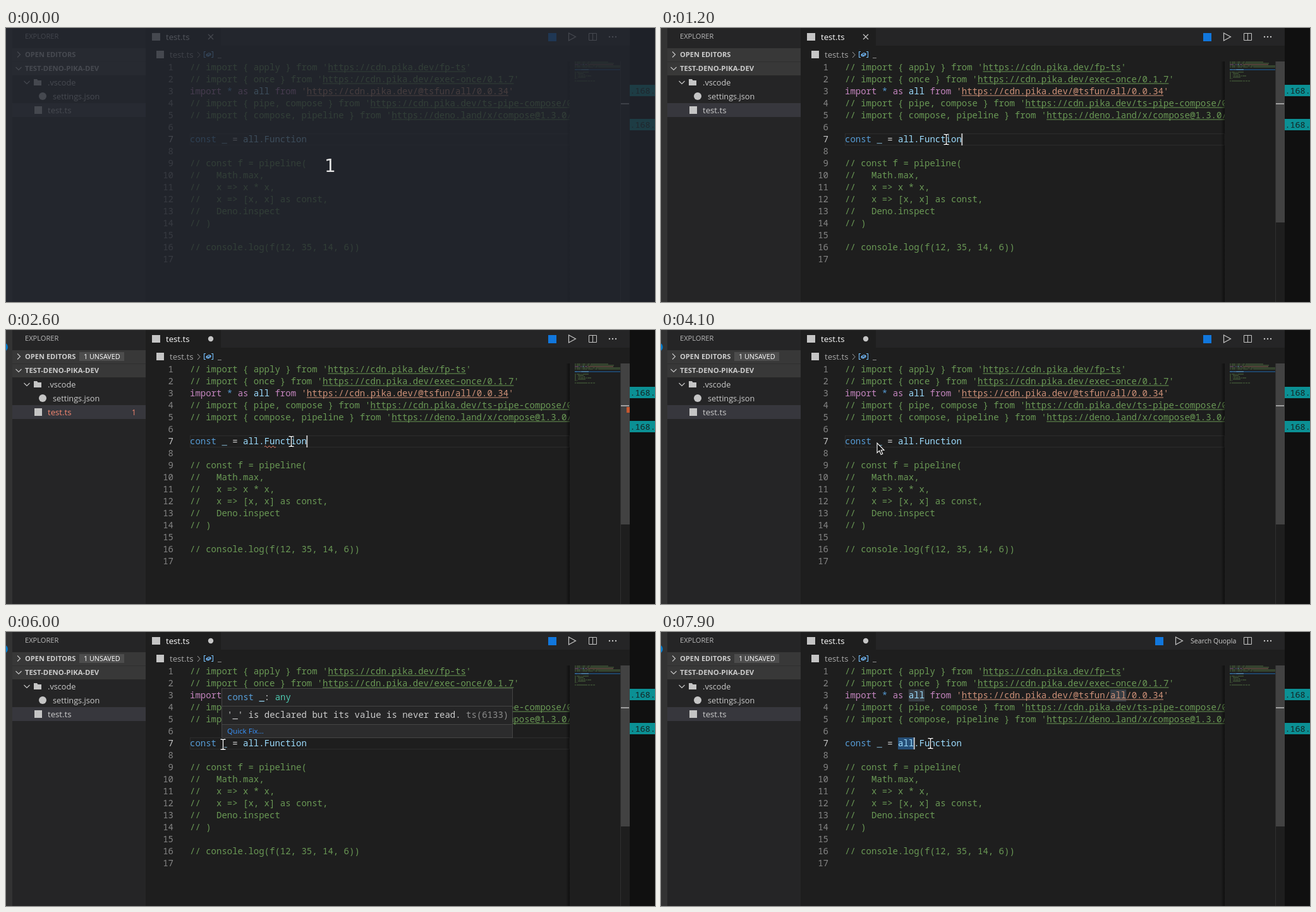
An HTML page that plays this animation: 1027 by 434 pixels, repeating every 8 s.

```html
<!DOCTYPE html>
<html lang="en">
<head>
<meta charset="utf-8">
<title>Editor</title>
<style>
html, body { margin: 0; width: 100%; height: 100%; overflow: hidden; background: #1e1e1e; }
svg { display: block; width: 1027px; height: 434px; }
text { white-space: pre; }
.ui { font-family: 'Open Sans', 'Noto Sans', sans-serif; }
.code { font: 14px 'Roboto Mono', 'Noto Sans Mono', monospace; }
.line { fill: none; stroke: #c5c5c5; }
</style>
</head>
<body>
<svg id="stage" viewBox="0 0 1027 434" xmlns="http://www.w3.org/2000/svg"></svg>
<script>
const LOOP = 8000, LEFT = 291, CH = 8.4;
const C = {
  comment: '#6a9955', key: '#c586c0', blue: '#569cd6', name: '#9cdcfe',
  str: '#ce9178', plain: '#d4d4d4', ui: '#cccccc', error: '#f48771'
};
const midY = n => 62 + 19 * (n - 1);
const colX = c => LEFT + c * CH;

const rect = (x, y, w, h, fill, more = '') =>
  `<rect x="${x}" y="${y}" width="${w}" height="${h}" fill="${fill}" ${more}/>`;
const path = (d, more = '') => `<path d="${d}" class="line" ${more}/>`;
const ui = (x, y, s, size = 13, fill = C.ui, more = '') =>
  `<text class="ui" x="${x}" y="${y}" font-size="${size}" fill="${fill}" ${more}>${s}</text>`;
const esc = s => s.replace(/&/g, '&amp;').replace(/</g, '&lt;').replace(/>/g, '&gt;');
const code = (x, y, parts, more = '') =>
  `<text class="code" xml:space="preserve" x="${x}" y="${y}" ${more}>` +
  parts.map(([s, c, m = '']) => `<tspan fill="${c}" ${m}>${esc(s)}</tspan>`).join('') + '</text>';
const group = (id, body, more = '') => `<g id="${id}" ${more}>${body}</g>`;
const chevron = (x, y, down) =>
  path(down ? `M${x - 4.5} ${y - 2}l4.5 4.5l4.5-4.5` : `M${x - 2} ${y - 4.5}l4.5 4.5l-4.5 4.5`, 'stroke-width="1.2"');
const symbolIcon = (x, y) =>
  `<g transform="translate(${x} ${y})" fill="none" stroke="#75beff" stroke-width="1.1">
  <path d="M-4.5-4.5h-2.5v9h2.5M4.5-4.5h2.5v9h-2.5M-3.5 0l4-2.5l3 1.2v2l-4 2.3l-3-1.2zM-3.5 0l3 1.2l4-2.5M-.5 1.2v1.8"/></g>`;

const note = s => [[s, C.comment]];
const lines = [
  note("// import { apply } from 'https://cdn.pika.dev/fp-ts'"),
  note("// import { once } from 'https://cdn.pika.dev/exec-once/0.1.7'"),
  [['import ', C.key], ['* ', C.blue], ['as ', C.key], ['all ', C.name], ['from ', C.key],
    ["'https://cdn.pika.dev/@tsfun/all/0.0.34'", C.str]],
  note("// import { pipe, compose } from 'https://cdn.pika.dev/ts-pipe-compose/0.2.1'"),
  note("// import { compose, pipeline } from 'https://deno.land/x/compose@1.3.0/index.js'"),
  [],
  [['const ', C.blue], ['_', C.name, 'opacity=".67"'], [' = ', C.plain], ['all.', C.name],
    ['Function', C.name, 'id="word"']],
  [],
  note('// const f = pipeline('),
  note('//   Math.max,'),
  note('//   x => x * x,'),
  note('//   x => [x, x] as const,'),
  note('//   Deno.inspect'),
  note('// )'),
  [],
  note('// console.log(f(12, 35, 14, 6))'),
  []
];

function drawLine(parts, i) {
  const y = midY(i + 1), s = parts.map(p => p[0]).join('');
  const url = s.match(/https[^']+/);
  let out = code(LEFT, y + 5, parts);
  if (url) out += rect(colX(url.index), y + 6.5, url[0].length * CH, 1, parts[parts.length - 1][1]);
  return out;
}

function drawMinimap() {
  let out = rect(900, 65, 72, 2, '#1f4468');
  lines.forEach((parts, i) => {
    let col = 0;
    for (const [s, c] of parts) {
      for (const m of s.matchAll(/\S+/g))
        out += rect(900 + col + m.index, 53.3 + 2 * i, m[0].length, 1.2, c, 'opacity=".5"');
      col += s.length;
    }
  });
  return `<g clip-path="url(#mapClip)">${out}</g>`;
}

function drawSidebar() {
  return rect(0, 0, 10, 434, '#333333') + rect(10, 0, 211, 434, '#252526') +
    rect(10, 32, 211, 21, '#383838') + rect(10, 53.5, 211, 21.5, '#383838') +
    rect(10, 119, 211, 22, '#37373d') +
    ui(30, 17, 'EXPLORER', 11.1, '#bbbbbb') +
    chevron(20, 42) + ui(30, 46, 'OPEN EDITORS', 11.1, C.ui, 'font-weight="700"') +
    chevron(20, 64, true) + ui(30, 68, 'TEST-DENO-PIKA-DEV', 11.3, C.ui, 'font-weight="700"') +
    chevron(33, 86, true) +
    '<path d="M44 81h5l1.5 2h5.5v8h-12z" fill="#c5c5c5"/>' + ui(66, 91, '.vscode', 12.7) +
    '<circle cx="58" cy="108" r="6" fill="#c5c5c5"/>' + ui(74, 113, 'settings.json', 12.7) +
    rect(45, 124, 12, 12, '#c5c5c5') + ui(66, 135, 'test.ts', 13.2, C.ui, 'id="file"') +
    ui(199, 135, '1', 12, C.error, 'id="count"') +
    group('unsaved', rect(116, 35, 71, 14, '#4d4d4d') + ui(123, 45.5, '1 UNSAVED', 10.8, '#fff') +
      '<circle cx="-4" cy="27" r="7" fill="#007acc"/>');
}

function drawHeader() {
  return rect(221, 0, 766, 28, '#252526') + rect(221, 0, 119, 28, '#1e1e1e') +
    rect(231, 8, 13, 12, '#c5c5c5') + ui(253, 19, 'test.ts', 13.2, '#fff') +
    path('M320 10l8 8m0-8l-8 8', 'id="close" stroke-width="1.2"') +
    '<circle id="dot" cx="324" cy="14" r="4.2" fill="#c5c5c5"/>' +
    group('tools', rect(858, 8, 13, 13, '#1177dd') + path('M890.5 8v12l11-6z', 'stroke-width="1.2"')) +
    ui(838, 18, 'Search Quopla', 10.6, C.ui, 'id="search"') +
    path('M922.5 8.5h12v11h-12zM928.5 8.5v11') +
    [955, 960, 965].map(x => `<circle cx="${x}" cy="14" r="1.2" fill="#c5c5c5"/>`).join('') +
    rect(238, 36, 12, 12, '#c5c5c5') + ui(259, 47, 'test.ts', 13.2, '#a9a9a9') +
    path('M303 38l4 4.5l-4 4.5', 'opacity=".8"') + symbolIcon(320.5, 42) + ui(335, 46, '_', 13, '#a9a9a9');
}

function drawSuggest() {
  const rows = [['Function', 'import Function'], ['ffm', 'FlowFixMe (React-Na…'], ['for', 'For Loop (TypeScrip…'],
    ['foreach =>', 'For-Each Loop using…'], ['forin', 'For-In Loop (TypeSc…'],
    ['forof', 'For-Of Loop (TypeSc…'], ['function', 'Function Statement …']];
  let out = rect(417.5, 186.5, 429, 132, '#252526', 'stroke="#454545"') + rect(418, 187, 428, 19, '#062f4a');
  rows.forEach(([label, info], i) => {
    const y = 196 + 19 * i;
    out += code(440.5, y + 5, [[label[0], '#0097fb', 'font-weight="700"'], [label.slice(1), C.plain]]) +
      code(i ? 660 : 710, y + 5, [[info, i ? '#929292' : '#9aa9b3']]);
    out += i ? path(`M422.5 ${y + 6.5}v-12h12v12`) + path(`M422.5 ${y + 6.5}h12`, 'stroke-dasharray="2 1.5"')
      : symbolIcon(428, y + 1);
  });
  return out;
}

function drawHover() {
  return rect(341.5, 89.5, 460, 78, '#252526', 'stroke="#454545"') + rect(342, 147, 459, 20, '#2c2c2d') +
    rect(342, 117, 459, 1, '#454545') + rect(342, 146, 459, 1, '#454545') +
    code(350, 108, [['const ', C.blue], ['_', C.name], [': ', C.plain], ['any', '#4ec9b0']]) +
    code(350, 136, [["'_' is declared but its value is never read. ", C.ui], ['ts(6133)', '#8c8c8c']]) +
    ui(350, 161, 'Quick Fix...', 11.6, '#3794ff');
}

function drawTerminal() {
  return rect(987, 0, 40, 434, '#101010') + [90, 144].map(y =>
    rect(987, y, 40, 18, '#0b9094') +
    code(987.5, y + 14, [['.168.', '#152020']], 'style="font-size:13.4px"')).join('');
}

const wave = 'M409 185' + 'q1.5-3 3 0t3 0'.repeat(3);
const beam = 'M-4-8h2.5q1.5 0 1.5 1.5v13q0 1.5-1.5 1.5h-2.5M4-8h-2.5q-1.5 0-1.5 1.5v13q0 1.5 1.5 1.5h2.5';
const stage = document.getElementById('stage');
stage.innerHTML = `<defs>
  <clipPath id="codeClip"><rect x="221" y="53" width="671" height="381"/></clipPath>
  <clipPath id="mapClip"><rect x="892" y="53" width="80" height="381"/></clipPath>
  <linearGradient id="shade"><stop stop-color="#000" stop-opacity="0"/><stop offset="1" stop-color="#000" stop-opacity=".5"/></linearGradient>
  </defs>` +
  rect(221, 0, 766, 434, '#1e1e1e') + drawSidebar() + drawHeader() +
  group('current', rect(291.5, 167.5, 600, 18, 'none', 'stroke="#2d2d2d"')) +
  rect(0, 167, 0, 19, '#264f78', 'id="sel"') +
  group('same', [12, 50].map(c => rect(colX(c), 91, 25.2, 19, '#373d43')).join('')) +
  `<g clip-path="url(#codeClip)">${lines.map(drawLine).join('')}</g>` +
  lines.map((_, i) => ui(265, midY(i + 1) + 5, i + 1, 14, i === 6 ? '#c6c6c6' : '#858585',
    'text-anchor="end" style="font-family:\'Roboto Mono\',\'Noto Sans Mono\',monospace"')).join('') +
  path(wave, `id="wave" style="stroke:${C.error}"`) +
  rect(0, 167, 1.8, 19, '#d0d0d0', 'id="caret"') +
  rect(886, 53, 6, 381, 'url(#shade)') + drawMinimap() +
  rect(972, 53, 1, 381, '#303030') + rect(973, 53, 14, 255, '#797979', 'id="slider"') +
  rect(973, 119, 13, 2, '#a0a0a0') + rect(982, 122, 5, 9, '#c4572f', 'id="mark"') +
  drawTerminal() + group('suggest', drawSuggest()) + group('hover', drawHover()) +
  group('beam', `<path d="${beam}" fill="none" stroke="#000" stroke-width="3.4"/>
    <path d="${beam}" fill="none" stroke="#fff" stroke-width="1.4"/>`) +
  group('arrow', '<path d="M0 0v15.5l3.6-3.3l2.6 6l2.6-1.2l-2.6-5.7h4.8z" fill="#111" stroke="#fff" stroke-width="1.1"/>') +
  group('countdown', rect(0, 0, 1027, 434, '#23272f', 'opacity=".79"') +
    '<text x="513" y="228" font-size="28" text-anchor="middle" fill="#e2e2e2" font-family="\'DejaVu Sans\', sans-serif">1</text>');

const el = {};
stage.querySelectorAll('[id]').forEach(e => el[e.id] = e);
const show = (id, on) => el[id].setAttribute('visibility', on ? 'visible' : 'hidden');
const set = (id, key, v) => el[id].setAttribute(key, v);

// time, x, y of the pointer
const route = [
  [500, 982, 100], [600, 850, 128], [700, 660, 190], [800, 499, 205], [900, 499, 205],
  [1000, 480, 190], [1200, 451.5, 176.5], [3100, 451.5, 176.5], [3300, 396, 174], [3500, 396, 174],
  [3800, 327, 172], [3900, 338, 182], [4000, 338, 182], [4100, 342, 179], [4200, 343.5, 178],
  [6600, 343.5, 178], [6800, 301, 177], [7000, 388, 177], [7600, 388, 177], [7900, 426.5, 176.5], [8000, 426.5, 176.5]
];
function pointer(t) {
  const i = Math.max(1, route.findIndex(k => k[0] >= t));
  const [a, b] = [route[i - 1], route[i]];
  const p = (t - a[0]) / (b[0] - a[0]);
  return [a[1] + (b[1] - a[1]) * p, a[2] + (b[2] - a[2]) * p];
}

// caret: start, end, column
const carets = [[1200, 1900, 22], [1900, 2100, 15], [2100, 2900, 22], [3300, 3900, 22], [4400, 4900, 22],
  [5400, 5900, 22], [6100, 6700, 7], [7200, 7700, 11], [7700, 8000, 13]];
// selection: start, end, column, length
const picks = [[1400, 1900, 14, 8], [6300, 7200, 6, 1], [7700, 8000, 10, 3]];

function render(time) {
  const t = Math.floor(time / 100) * 100;
  const within = (a, b) => t >= a && t < b;
  const at = list => list.find(k => within(k[0], k[1]));

  show('countdown', t < 300);
  const dirty = t >= 1900;
  show('unsaved', dirty);
  show('dot', dirty);
  show('close', !dirty);

  const pick = at(picks), wide = pick || within(1900, 2100);
  show('current', !pick);
  set('sel', 'x', pick ? colX(pick[2]) : 0);
  set('sel', 'width', pick ? pick[3] * CH : 0);
  show('same', t >= 7700);
  show('search', wide);
  set('tools', 'transform', `translate(${wide ? -76 : 0} 0)`);

  const typed = within(1900, 2100) ? 'F' : 'Function';
  if (el.word.textContent !== typed) el.word.textContent = typed;
  show('suggest', within(1900, 2100));

  const bad = within(2600, 2800);
  show('wave', bad);
  show('count', bad);
  show('mark', within(2600, 2900));
  set('file', 'fill', bad ? C.error : C.ui);

  const caret = at(carets);
  show('caret', caret);
  if (caret) set('caret', 'x', colX(caret[2]) - 0.4);

  set('slider', 'opacity', 0.4 * Math.min(1, Math.max(0, (t - 400) / 400)));
  show('hover', within(4200, 6100));
  set('hover', 'opacity', t < 4400 ? 0.75 : 1);

  const arrow = t === 4100;
  show('arrow', arrow);
  show('beam', t >= 500 && !arrow);
  if (t >= 500) set(arrow ? 'arrow' : 'beam', 'transform', `translate(${pointer(t)})`);
}

const start = performance.now();
function tick() {
  render((performance.now() - start) % LOOP);
  requestAnimationFrame(tick);
}
render(0);
requestAnimationFrame(tick);
</script>
</body>
</html>
```
